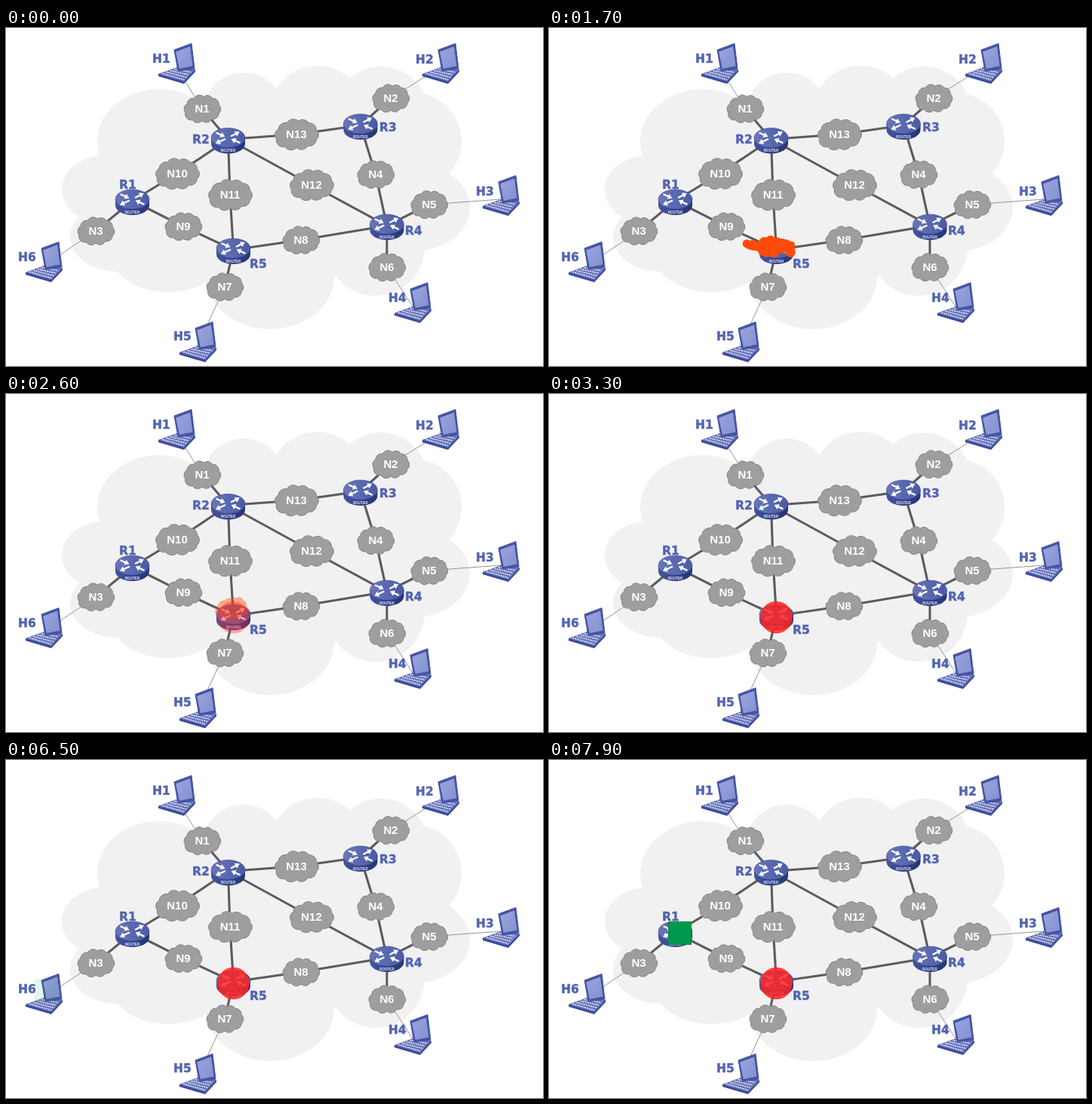
Write an HTML page that moves like this. It is 712 px wide and 448 px high and loops after 8000 ms.

```html
<!DOCTYPE html>
<html lang="en">
<head>
<meta charset="utf-8">
<title>Network with a failing router</title>
<style>
  html, body { margin: 0; width: 100%; height: 100%; overflow: hidden; background: #fff; }
  svg { display: block; width: 100vw; height: 100vh; }
  .net { font: bold 15px "Liberation Sans", Arial, sans-serif; fill: #fff; text-anchor: middle; }
  .name { font: bold 15.5px "DejaVu Sans", sans-serif; fill: #5265b2; stroke: #5265b2; stroke-width: .5; }
  .tiny { font: bold 4.6px "Liberation Sans", sans-serif; fill: #e4e8f5; text-anchor: middle; }
</style>
</head>
<body>
<svg id="stage" viewBox="0 0 712 448">
  <defs>
    <linearGradient id="side" x1="0" x2="1">
      <stop offset="0" stop-color="#44539f"/><stop offset=".5" stop-color="#34448f"/><stop offset="1" stop-color="#26346f"/>
    </linearGradient>
    <linearGradient id="top" x1="0" x2="1">
      <stop offset="0" stop-color="#6976b8"/><stop offset="1" stop-color="#4a5aa6"/>
    </linearGradient>
    <linearGradient id="screen" x1="0" y1="0" x2="1" y2="1">
      <stop offset="0" stop-color="#9aa5de"/><stop offset="1" stop-color="#8491d0"/>
    </linearGradient>
    <g id="router">
      <path d="M-22.500-4V4A22.500 13 0 0 0 22.500 4V-4Z" fill="url(#side)"/>
      <ellipse cy="-4" rx="22.5" ry="13" fill="url(#top)" stroke="#3d4d96" stroke-width=".6"/>
      <g id="arrows" transform="translate(0 .5) scale(1.18)" fill="none" stroke="#fff" stroke-width="2"></g>
      <text class="tiny" y="14.6">ROUTER</text>
    </g>
    <g id="laptop">
      <path d="M-24 14L1 5L25 8V11L10 27L-24 17Z" fill="#3b4a98"/>
      <path d="M-24 14L1 5L25 8L10 24Z" fill="#6673ba"/>
      <path id="keys" fill="none" stroke="#e2e6f6" stroke-width="1.6" stroke-dasharray="2.2 1"/>
      <path d="M-3-18L20-26.500L24 7L2 10Z" fill="#4654a3" stroke="#4654a3" stroke-linejoin="round"/>
      <path d="M-.8-15.500L18-22.500L21.500 3.500L3.800 7Z" fill="url(#screen)"/>
    </g>
  </defs>
  <g id="sky" fill="#f1f1f1"></g>
  <g id="wires"></g>
  <g id="nets"></g>
  <g id="nodes"></g>
  <g id="fire" fill="#ff4a0c"></g>
  <circle id="alarm" cx="301.5" cy="296" r="21.3" fill="#ff2421"/>
  <rect id="packet" x="-15" y="-15" width="30" height="30" fill="#00984e" stroke="#078745"/>
</svg>
<script>
const $ = id => document.getElementById(id);

function add(parent, tag, attrs, text) {
  const el = document.createElementNS('http://www.w3.org/2000/svg', tag);
  for (const k in attrs) el.setAttribute(k, attrs[k]);
  if (text) el.textContent = text;
  parent.appendChild(el);
  return el;
}

const clamp = x => Math.max(0, Math.min(1, x));
const span = (t, a, b) => clamp((t - a) / (b - a));
const smooth = p => p * p * (3 - 2 * p);
const mix = (a, b, p) => a + (b - a) * p;

let seed = 11;
function rand() {
  seed = (seed * 16807) % 2147483647;
  return seed / 2147483647;
}

// Lobes of the large cloud: cx, cy, rx, ry
const lobes = [
  [130, 214, 56, 45], [203, 150, 82, 69], [315, 115, 55, 56], [413, 110, 62, 60],
  [497, 112, 62, 61], [540, 150, 64, 64], [540, 238, 75, 58], [490, 290, 65, 65],
  [350, 330, 85, 69], [215, 300, 75, 50], [148, 277, 63, 46], [345, 220, 220, 120]
];

const nets = {
  N1: [260, 107], N2: [510, 93], N3: [119, 269], N4: [490, 194], N5: [561, 234],
  N6: [505, 317], N7: [290, 343], N8: [391, 281], N9: [235, 263],
  N10: [227, 193], N11: [297, 221], N12: [405, 208], N13: [385, 141]
};

// Centre, then start of the label's baseline
const routers = {
  R1: [167.5, 231, 150, 213], R2: [294.5, 149.5, 247, 153], R3: [470, 131, 495, 137],
  R4: [505, 264, 529, 274], R5: [301.5, 296, 323, 318]
};
const hosts = {
  H1: [226, 47, 194, 46], H2: [576, 47, 543, 47], H3: [656, 222, 623, 222],
  H4: [539, 364, 507, 363], H5: [254, 416, 222, 414], H6: [50, 310, 16, 309]
};

const trunks = 'R1 N10 R2,R1 N9 R5,R2 N11 R5,R2 N12 R4,R2 N13 R3,R3 N4 R4,R5 N8 R4,' +
  'R4 N5,R4 N6,R5 N7,R1 N3,R2 N1,R3 N2';
const taps = 'H1 N1,H2 N2,H3 N5,H4 N6,H5 N7,H6 N3';

const place = { ...nets, ...routers, ...hosts };
const lift = { N: 0, R: -2, H: 5 };

function wire(list, color, width) {
  for (const route of list.split(',')) {
    const points = route.split(' ').map(n => [place[n][0], place[n][1] + lift[n[0]]]).join(' ');
    add($('wires'), 'polyline', { points, fill: 'none', stroke: color, 'stroke-width': width });
  }
}

function puff(sx, sy) {
  const rim = [[-21, 5], [-19, -6], [-10, -13], [2, -15], [13, -13], [21, -5], [21, 6], [12, 13], [0, 15], [-12, 14]];
  const at = ([x, y]) => (x * sx).toFixed(1) + ' ' + (y * sy).toFixed(1);
  return 'M' + at(rim[0]) + rim.map((_, i) =>
    `A${7.5 * sx} ${7.5 * sy} 0 0 1 ${at(rim[(i + 1) % rim.length])}`).join('') + 'Z';
}

function device(list, shape) {
  for (const name in list) {
    const [x, y, lx, ly] = list[name];
    add($('nodes'), 'use', { href: '#' + shape, x, y });
    add($('nodes'), 'text', { class: 'name', x: lx, y: ly }, name);
  }
}

function arrow(x, y, dx, dy) {
  const a = Math.atan2(dy, dx) * 180 / Math.PI;
  const g = add($('arrows'), 'g', { transform: `translate(${x} ${y}) rotate(${a})` });
  add(g, 'path', { d: `M0 0H${Math.hypot(dx, dy) - 2}` });
  add(g, 'path', { d: `M${Math.hypot(dx, dy)} 0l-5-3.200v6.400Z`, fill: '#fff', stroke: 'none' });
}

for (const [cx, cy, rx, ry] of lobes) add($('sky'), 'ellipse', { cx, cy, rx, ry });

wire(taps, '#949494', 1);
wire(trunks, '#5c5c5c', 3.1);

for (const name in nets) {
  const [x, y] = nets[name];
  const wide = name.length > 2;
  const g = add($('nets'), 'g', { transform: `translate(${x} ${y})` });
  add(g, 'path', { d: wide ? puff(1.26, 1.18) : puff(1.06, 1.06), fill: '#9e9e9e', stroke: '#858585' });
  add(g, 'text', { class: 'net', y: 5.4 }, name);
}

arrow(-13.5, -9.5, 10, 4.5);
arrow(3, -5.5, 10, -5);
arrow(-3, -2.5, -11, 5);
arrow(13.5, 2, -10, -4.5);

let rows = '';
for (let i = 0; i < 4; i++) {
  const p = (i + .8) / 4.2;
  rows += `M${mix(1, -21, p)} ${mix(6, 14, p)}L${mix(22, 9, p)} ${mix(9, 23, p)}`;
}
$('keys').setAttribute('d', rows);

device(routers, 'router');
device(hosts, 'laptop');

// Embers start strewn sideways and gather on top of R5
const count = 34;
const embers = Array.from({ length: count }, (_, i) => {
  const u = i / (count - 1);
  const x = 236 + 97 * Math.pow(u, .8);
  const high = x > 275 ? 12 : 6;
  const a = i * 2.4, r = Math.sqrt((i + .5) / count);
  return {
    x, y: 293 + (rand() * 2 - 1) * high,
    tx: 299 + 17.5 * r * Math.cos(a) + rand() * 2,
    ty: 284 + 10.5 * r * Math.sin(a) - 2 * r * Math.cos(a),
    el: add($('fire'), 'circle', { r: 4.8 + rand() * 2 })
  };
});

function draw(ms) {
  const t = Math.floor(ms / 100) * 100;

  const gather = smooth(span(t, 1400, 2100));
  $('fire').style.display = t >= 1400 && t < 2900 ? '' : 'none';
  $('fire').style.opacity = 1 - span(t, 2200, 2900);
  for (const e of embers) {
    e.el.setAttribute('cx', mix(e.x, e.tx, gather));
    e.el.setAttribute('cy', mix(e.y, e.ty, gather));
  }

  $('alarm').style.opacity = .85 * span(t, 2200, 3100);

  const move = smooth(span(t, 7320, 7900));
  $('packet').style.opacity = Math.pow(span(t, 6400, 7000), 1.3);
  $('packet').setAttribute('transform', `translate(${mix(53, 173.5, move)} ${mix(306, 229.5, move)})`);
}

function tick() {
  draw(performance.now() % 8000);
  requestAnimationFrame(tick);
}
tick();
</script>
</body>
</html>
```
